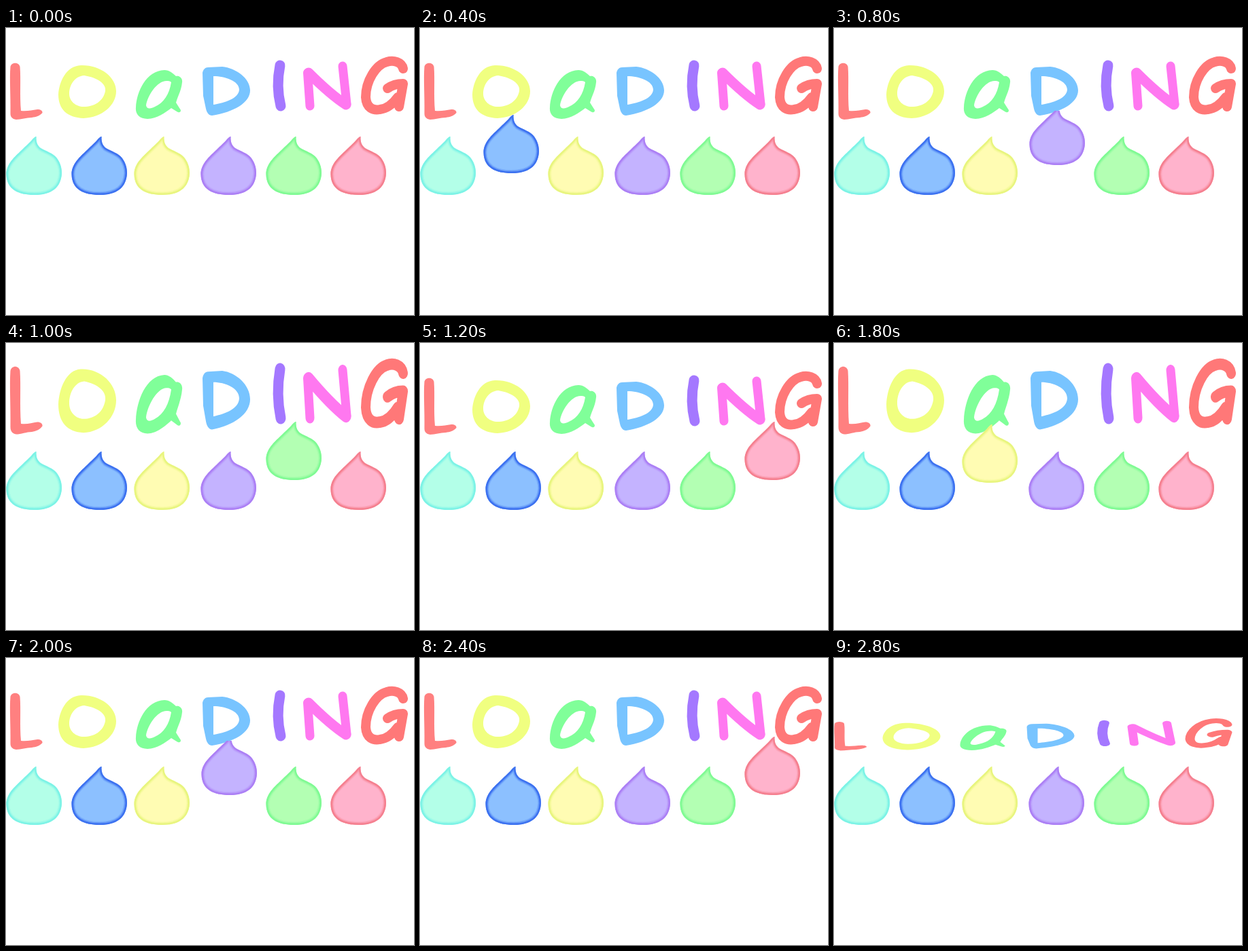
Recreate the animation shown at these times as an HTML page. Size 600 by 423 pixels, loop 3000 ms.

```html
<!DOCTYPE html>
<html lang="en">
<head>
<meta charset="utf-8">
<title>Loading</title>
<style>
  html, body { margin: 0; width: 100%; height: 100%; overflow: hidden; background: #fff; }
  svg { display: block; width: 100vw; height: 100vh; }
</style>
</head>
<body>
<svg viewBox="0 0 600 423" role="img" aria-label="Loading">
  <defs>
    <path id="drop" d="M44.500 160C44 168 46 173 51 177C59 182 69 184 75 192C80 199 82 206 82 214C81 236 66 246 42 246C18 246 1 238 .5 216C0 200 14 189 22 181C30 173 36 168 39 164C41 162 43 160 44.500 160Z"/>
    <clipPath id="inside"><use href="#drop"/></clipPath>
    <clipPath id="blunt"><rect y="166" width="90" height="90"/></clipPath>
  </defs>
  <g id="word" fill="none" stroke-linecap="round" stroke-linejoin="round">
    <path fill="#ff8080" d="M6.500 57C8 50 19 50 20.500 57C22 75 20 100 22 122C31 123 38 121 46 120C51 120 54 122 53.500 125C49 130 44 131 38 132C30 132 22 135 15 135C9 134 6.500 131 6.500 126C7 100 5 75 6.500 57Z"/>
    <path fill="#f0ff80" fill-rule="evenodd" d="M110 55C138 54 162 72 162 93C162 114 141 132 114 133C90 132 77 120 77 98C78 80 88 56 110 55ZM115 70C134 73 148 82 146 93C143 108 130 116 114 116C103 116 93 108 93 97C93 84 101 71 115 70Z"/>
    <path fill="#80ff99" fill-rule="evenodd" d="M233 62C240 62 246 67 250 71C255 70 260 74 259 80C258 92 252 102 250 110L257 121C257 125 254 125 251 123L243 118C235 124 222 134 208 134C196 134 190 127 191 117C192 94 206 63 233 62ZM236 78C222 78 208 100 206 114C207 120 213 119 219 116C232 110 240 98 243 80C241 78 239 78 236 78Z"/>
    <path fill="#78c4ff" fill-rule="evenodd" d="M297 58L318 57C338 59 359 74 359 92C359 110 335 124 303 129C298 129 295 124 294 119L290 100L289 66C290 61 293 58 297 58ZM305 71C322 71 343 78 343 91C342 104 322 110 305 113Z"/>
    <path stroke="#a478ff" stroke-width="15" d="M403 55C399 75 399 95 404 115"/>
    <g stroke="#ff78f0">
      <path stroke-width="13" d="M443.500 66L447 115M495 56L501 112"/>
      <path stroke-width="15" d="M445 66C462 83 480 100 500 113"/>
    </g>
    <path stroke="#ff7878" stroke-width="14" d="M584 60C582 50 570 47 560 50C544 54 529 78 529 102C530 118 540 122 550 120C559 119 568 113 576 102M561 89C568 84 576 82 584 82L578 116"/>
  </g>
  <g id="drops"></g>
</svg>
<script>
const STEP = 200, STEPS = 15;

// x: resting offset, up: raised shift
const DROPS = [
  { x: 0,   up: [0, -38],  fill: '#b3ffe8', edge: '#7df3e6' },
  { x: 96,  up: [-3, -32], fill: '#8cc0ff', edge: '#3d72f0' },
  { x: 188, up: [0, -40],  fill: '#fffcb3', edge: '#e8f57f' },
  { x: 286, up: [1, -44],  fill: '#c4b3ff', edge: '#ac80f5', blunt: true },
  { x: 382, up: [0, -44],  fill: '#b3ffb3', edge: '#80fa94' },
  { x: 477, up: [0, -44],  fill: '#ffb3cc', edge: '#f58090' }
];

const POSES = {
  normal: '',
  tall: 'translate(0 -27.4) scale(1 1.2)',
  flat: 'translate(-5.500 67.6) scale(1 .51)'
};
const CYCLE = ['normal', 'tall', 'normal', 'flat'];

const word = document.getElementById('word');
const stage = document.getElementById('drops');

// Stacked strokes soften the rim towards the middle.
const RIM = [[10, .2], [7.5, .4], [5, 1]];
stage.innerHTML = DROPS.map(({ fill, edge }) => `<g><g clip-path="url(#inside)">
  <use href="#drop" fill="${fill}"/>
  ${RIM.map(([w, o]) => `<use href="#drop" fill="none" stroke="${edge}" stroke-width="${w}" stroke-opacity="${o}"/>`).join('')}
</g></g>`).join('');

function draw(step) {
  const pose = step === STEPS - 1 ? 'flat' : step === STEPS - 2 ? 'tall' : CYCLE[step % 4];
  word.setAttribute('transform', POSES[pose]);
  const raised = step > 0 && step <= 12 ? (step - 1) % DROPS.length : -1;
  DROPS.forEach(({ x, up, blunt }, i) => {
    const [dx, dy] = i === raised ? up : [0, 0];
    const node = stage.children[i];
    node.setAttribute('transform', `translate(${x + dx} ${dy})`);
    node.setAttribute('clip-path', blunt && i === raised ? 'url(#blunt)' : 'none');
  });
}

const start = performance.now();
function tick() {
  draw(Math.floor((performance.now() - start) / STEP) % STEPS);
  requestAnimationFrame(tick);
}
tick();
</script>
</body>
</html>
```
